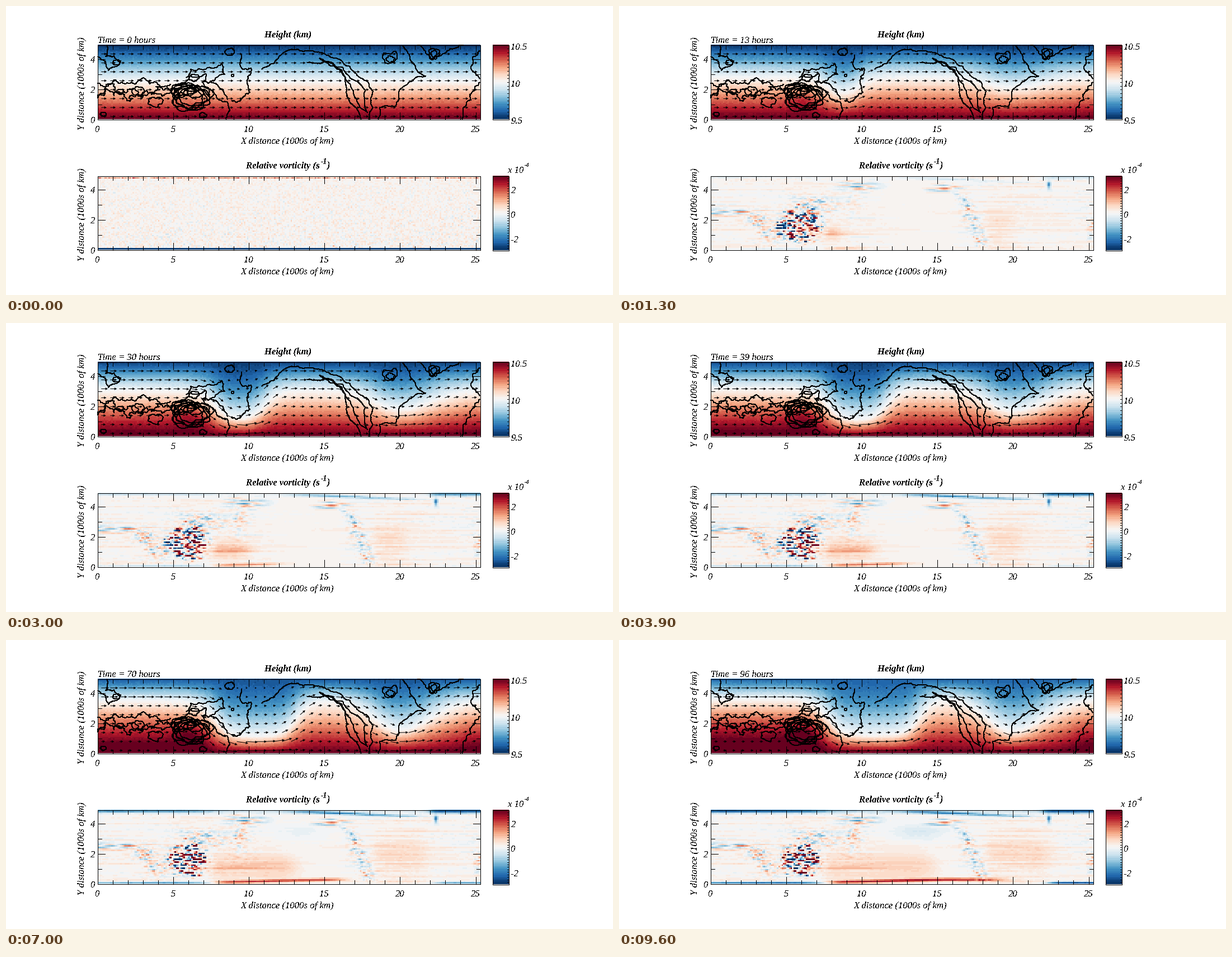
Recreate the animation shown at these times as a matplotlib script. Size 1085x516 px, loop 9700 ms.

```python
import numpy as np
import matplotlib.pyplot as plt
from matplotlib.animation import FuncAnimation
from matplotlib.collections import LineCollection

W, H, DPI = 1085, 516, 100
LAST_HOUR = 96
NX, NY = 254, 50
LEFT, RIGHT, SCALE = 163.5, 847.5, 27.04
rng = np.random.default_rng(12)

plt.rcParams.update({"font.family": "Liberation Serif", "font.style": "italic",
                     "text.antialiased": False})
PX = 72 / DPI
cmap = plt.get_cmap("RdBu_r", 40)

fig = plt.figure(figsize=(W / DPI, H / DPI), dpi=DPI, facecolor="white")
ax = fig.add_axes([0, 0, 1, 1])
ax.axis("off")

x = np.linspace(0.05, 25.25, NX)
y = np.linspace(0.05, 4.87, NY)
X, Y = np.meshgrid(x, y)


# ---------- fixed layout ----------
def label(px, py, text, size=16.8, **style):
    return ax.text(px, py, text, fontsize=size * PX, va="baseline", **style)


def segments(lines, z):
    ax.add_collection(LineCollection(lines, colors="black", linewidths=PX,
                                     antialiaseds=False, zorder=z))


def box(l, r, t, b):
    return [(l, t), (r, t), (r, b), (l, b), (l, t)]


def panel(top, bottom):
    lines = [box(LEFT, RIGHT, top, bottom)]
    for n in range(26):
        px, size = LEFT + SCALE * n, 13 if n % 5 == 0 else 7
        lines += [[(px, top), (px, top + size)], [(px, bottom), (px, bottom - size)]]
        if n % 5 == 0:
            label(px, bottom + 22.5, str(n), ha="center")
    for n in range(5):
        py, size = bottom - 27 * n, 13 if n % 2 == 0 else 7
        lines += [[(LEFT, py), (LEFT + size, py)], [(RIGHT, py), (RIGHT - size, py)]]
        if n % 2 == 0:
            label(159.5, py + 6.5, str(n), ha="right")
    segments(lines, 5)
    label(503, bottom + 43.5, "X distance (1000s of km)", ha="center")
    label(140.5, (top + bottom) / 2 + 2.5, "Y distance (1000s of km)", ha="center",
          rotation=90, rotation_mode="anchor")
    return ax.imshow(np.zeros((NY, NX)), cmap=cmap, origin="lower", aspect="auto",
                     extent=(LEFT, RIGHT, bottom, top), interpolation="nearest", zorder=1)


def colour_bar(top, bottom, divisions, names):
    ax.imshow(np.arange(40)[:, None], cmap=cmap, origin="lower", aspect="auto",
              extent=(869.5, 898.5, bottom, top), interpolation="nearest", zorder=1)
    ticks = [[(895.5, py), (898.5, py)] for py in np.linspace(top, bottom, divisions + 1)]
    segments([box(869.5, 898.5, top, bottom)] + ticks, 5)
    for frac, name in names:
        label(902.5, bottom + (top - bottom) * frac + 8, name)


height_image = panel(69.5, 202.5)
vort_image = panel(303.5, 435.5)
height_image.set_clim(9.5, 10.5)
vort_image.set_clim(-3, 3)
colour_bar(69.5, 202.5, 20, [(1, "10.5"), (0.5, "10"), (0, "9.5")])
colour_bar(303.5, 436.5, 30, [(5 / 6, "2"), (0.5, "0"), (1 / 6, "-2")])
label(504.5, 55.5, "Height (km)", ha="center", weight="bold")
label(429, 289.5, "Relative vorticity (s", weight="bold")
label(562.5, 282, "-1", 13.5, weight="bold")
label(574.5, 289.5, ")", weight="bold")
label(897, 297.5, "x 10")
label(926.5, 287, "-4", 10.5)
clock = label(164, 66.5, "")


# ---------- orography contours ----------
contours = []


def inside(points):
    return np.clip(points, (164, 70), (847, 202))


def coast(*points, jitter=0.2, levels=4):
    """Roughen a path by repeated midpoint displacement."""
    p = np.array(points, float)
    for _ in range(levels):
        d = np.diff(p, axis=0)
        normal = np.column_stack([-d[:, 1], d[:, 0]])
        mid = (p[1:] + p[:-1]) / 2 + normal * rng.uniform(-jitter, jitter, (len(d), 1))
        out = np.empty((2 * len(p) - 1, 2))
        out[::2], out[1::2] = p, mid
        p = out
    contours.append(inside(p))


def ring(cx, cy, rx, ry, wobble=0.12):
    a = np.linspace(0, 2 * np.pi, 49)
    r = 1 + sum(rng.normal(0, wobble / k ** 0.6) * np.cos(k * a + rng.uniform(0, 6.3))
                for k in range(2, 9))
    contours.append(inside(np.column_stack([cx + rx * r * np.cos(a), cy + ry * r * np.sin(a)])))


# Western range of the right-hand continent
coast((457, 113), (470, 107), (487, 92), (505, 79), (537, 80), (575, 88), (615, 108),
      (637, 130), (656, 152), (655, 182), (648, 202), jitter=0.13)
coast((538, 101), (575, 99), (604, 124), (608, 155), (625, 181), (635, 202), jitter=0.13)
coast((560, 93), (603, 111), (642, 150), (646, 190), (618, 148), (600, 114), (560, 93),
      jitter=0.13)
# Its eastern side and the islands
coast((665, 202), (668, 181), (697, 179), (703, 150), (738, 126), (750, 125), (722, 95),
      (709, 71), jitter=0.13)
coast((675, 84), (697, 81), (699, 94), (678, 101), (675, 84))
coast((735, 70), (752, 86), (763, 96), (788, 80), (818, 70))
coast((847, 80), (831, 108), (847, 130))
coast((847, 136), (832, 155), (831, 168), (815, 202))
# Left edge
coast((164, 90), (183, 115), (205, 98), (178, 90), (180, 70))
for level in (141, 149, 158):
    px = np.linspace(164, 294, 10)
    coast(*zip(px, level + 6 * rng.standard_normal(10)), jitter=0.4, levels=3)
# High plateau fringes and the lands east of it
coast((294, 148), (321, 136), (330, 113), (356, 113), (386, 103), (391, 122), (350, 136))
coast((322, 128), (357, 121), (352, 136), (364, 160))
coast((350, 142), (373, 157), (395, 171), (393, 202))
coast((365, 136), (388, 149), (396, 167))
coast((421, 87), (424, 113), (438, 111), (436, 154), (411, 172), (403, 169))

for size in (1.06, 0.98, 0.9, 0.8, 0.62):
    ring(331, 164, 33 * size, 21 * size)
for size in (1, 0.75):
    ring(320, 149, 25 * size, 11 * size)
    ring(765, 85, 10 * size ** 2, 9 * size ** 2)
for cx, cy, r in [(312, 155, 10), (338, 153, 12), (336, 128, 7), (267, 171, 10), (236, 152, 9),
                  (204, 153, 5), (687, 95, 6), (174, 193, 4), (352, 195, 5), (400, 82, 7),
                  (197, 101, 5), (405, 124, 2)]:
    ring(cx, cy, r * 1.2, r * 0.9)
segments(contours, 3)


# ---------- height ----------
ripple = 0.005 * rng.standard_normal((NY, NX))


def step(v, edge, width):
    return 0.5 + 0.5 * np.tanh((v - edge) / width)


def blob(cx, cy, sx, sy):
    return np.exp(-((X - cx) / sx) ** 2 - ((Y - cy) / sy) ** 2)


west = 1 - step(X, 7.3, 0.6) + 0.7 * step(X, 24, 0.8)
plateau_bump = blob(6.1, 1.3, 1.0, 0.7)
px_x = LEFT + SCALE * x


def white_row(t):
    """Pixel row of the 10 km level: two troughs deepening below a rising ridge."""
    base = 135.5 - 32.5 * np.tanh(t / 65)
    east_edge = 398 + 158 * np.tanh(t / 70)
    first = 65 * (1 - np.exp(-t / 18)) * step(px_x, 372, 28) * (1 - step(px_x, east_edge, 26))
    half_width = np.where(px_x < 702, 62, 78)
    second = 62 * (1 - np.exp(-t / 38)) * np.exp(-((px_x - 702) / half_width) ** 2)
    return base + first + second


def height(t):
    s = t / LAST_HOUR
    row = white_row(t)
    level = (202.5 - row) / 27
    trough = np.clip((row - 135.5) / 35, 0, 1)
    low = np.clip((level - Y) / level, 0, 1)
    high = np.clip((Y - level) / (4.93 - level), 0, 1)
    warm = (0.5 + 0.1 * s * west) * low * (1 + 0.35 * s * west * (1 - low))
    cold = (0.5 - 0.1 * s) * high * (1 + 0.6 * trough * (1 - high))
    return 10 + warm - cold + 0.09 * min(t / 8, 1) * plateau_bump


# ---------- wind ----------
SAMPLE = np.s_[2::6, 2::6]
arrows = ax.quiver(LEFT + SCALE * X[SAMPLE], 202.5 - 27 * (Y[SAMPLE] - 0.05),
                   np.ones_like(X[SAMPLE]), np.zeros_like(X[SAMPLE]),
                   units="dots", scale_units="dots", scale=1, angles="uv", width=1,
                   headwidth=4.5, headlength=4.5, headaxislength=4.5, color="black", zorder=4)


def wind(h):
    dy, dx = np.gradient(h, y, x)
    u, v = -dy[SAMPLE] / 0.204 * 10, dx[SAMPLE] / 0.204 * 10
    return np.clip(u, 0.5, 21), np.clip(v, -8, 8)


# ---------- vorticity ----------
def grain(length):
    k = np.fft.rfftfreq(NX)
    f = np.fft.rfft(rng.standard_normal((NY, NX))) * np.exp(-2 * (np.pi * k * length) ** 2)
    field = np.fft.irfft(f, n=NX)
    return field / field.std()


speckle = rng.standard_normal((NY, NX))
fine, churn, streak, long_streak = grain(0.9), grain(1.0), grain(4), grain(16)
plateau = np.exp(-(((X - 5.9) / 1.35) ** 2 + ((Y - 1.6) / 1.0) ** 2) ** 2)
ridge_x = np.interp(Y, [0.2, 1.5, 2.5, 3.5, 4.1], [18, 17.5, 17.1, 16.7, 15.8])
ridge = np.exp(-((X - ridge_x) / 0.45) ** 2) * (1 - step(Y, 3.8, 0.2)) * step(Y, 0.2, 0.1)
quiet = 1 - 0.75 * step(X, 11, 1) * (1 - step(X, 16.3, 0.4))

start = 0.08 + 0.2 * speckle * (1.1 - 0.1 * Y)
start[-1] = 0
start[-2] = 1.1 + 0.45 * speckle[-2]
start[0] = -2.8

orographic = (
    ridge * (0.6 * fine - 0.25)
    + 1.5 * blob(15.4, 4.1, 1.0, 0.22) * streak
    + 1.2 * blob(9.8, 4.2, 1.2, 0.35) * (streak - 0.3)
    + 1.3 * blob(1.2, 2.45, 2.2, 0.25) * (streak - 0.2)
    + 0.8 * blob(3.0, 2.0, 0.7, 0.4) * fine
    + 0.6 * blob(4.0, 1.1, 0.8, 0.6) * fine
    + 0.7 * blob(6.8, 2.9, 1.3, 0.6) * fine
    + 0.5 * blob(25.2, 1.6, 0.35, 0.8) * fine
    - 2.2 * blob(22.35, 4.3, 0.13, 0.25)
)
top_edge = np.exp(-((4.82 - Y) / 0.14) ** 2)
top_slant = np.exp(-((Y - 4.75 + 0.04 * np.clip(X - 14, 0, 6)) / 0.09) ** 2)
bottom_edge = np.exp(-((Y - 0.04) / 0.09) ** 2)
jet = np.exp(-((Y - np.clip(0.1 + 0.022 * (X - 8), 0.1, 0.27)) / 0.1) ** 2)


def vorticity(t):
    s = t / LAST_HOUR
    grow = 1 - np.exp(-t / 5)
    turn = 0.9 * np.log1p(t / 6)
    mix = np.cos(turn) * fine + np.sin(turn) * churn
    hollow = 1 - blob(6.4, 1.25, 0.7, 0.4) * np.exp(-(t / 18) ** 2)
    z = 0.08 + orographic + 2.6 * plateau * hollow * mix * np.abs(mix)
    z += (0.13 * long_streak + 0.05 * fine) * quiet
    z += 0.45 * min(t / 40, 1) * blob(9.4, 3.1, 0.6, 1.1) * fine

    # Lee-side plumes spreading downstream
    front = 7.5 + 8.5 * s - 1.2 * s ** 2
    plume = step(X, 7.6, 0.4) * (1 - step(X, front - 0.5 * (Y - 1.1) ** 2, 0.6))
    z += (0.95 - 0.4 * s) * plume * np.exp(-((Y - 1.1) / (0.45 + 0.55 * s)) ** 2)
    z += 0.4 * step(X, 18.3, 0.4) * (1 - step(X, 19.4 + 3 * s, 0.6)) \
        * np.exp(-((Y - 1.3 - 0.6 * s) / 1.4) ** 2)
    z -= 0.5 * s ** 2 * blob(12.3 + 1.5 * s, 3.5, 2.0, 0.6)

    # Boundary layers
    left = 1 - step(X, 7.5, 1.2)
    top = 2.5 * s * left + 2.6 * min(t / 45, 1) * step(X, 22, 0.3)
    top = top + 0.8 * s * step(X, 7.5, 1) * (1 - step(X, 22, 0.3))
    z -= top * top_edge
    z -= 1.7 * min(t / 40, 1) * step(X, 13, 1) * (1 - step(X, 21, 1)) * top_slant
    z -= (1.9 * s * left + 2.7 * s ** 1.5 * step(X, 22.4, 0.5)) * bottom_edge
    z += 2.2 * np.sqrt(s) * step(X, 7.9, 0.6) * (1 - step(X, 8.5 + 10.5 * s, 0.9)) * jet

    fade = np.exp(-t / 1.5)
    return start * fade + z * grow + 0.08 * (1 - fade) * (1 - grow)


def update(hour):
    h = height(hour)
    height_image.set_data(h + ripple)
    vort_image.set_data(vorticity(hour))
    arrows.set_UVC(*wind(h))
    clock.set_text(f"Time = {hour} hours")
    return height_image, vort_image, arrows, clock


ax.set_xlim(0, W)
ax.set_ylim(H, 0)
update(0)
animation = FuncAnimation(fig, update, frames=LAST_HOUR + 1, interval=100,
                          repeat=True, repeat_delay=0)
plt.show()
```
